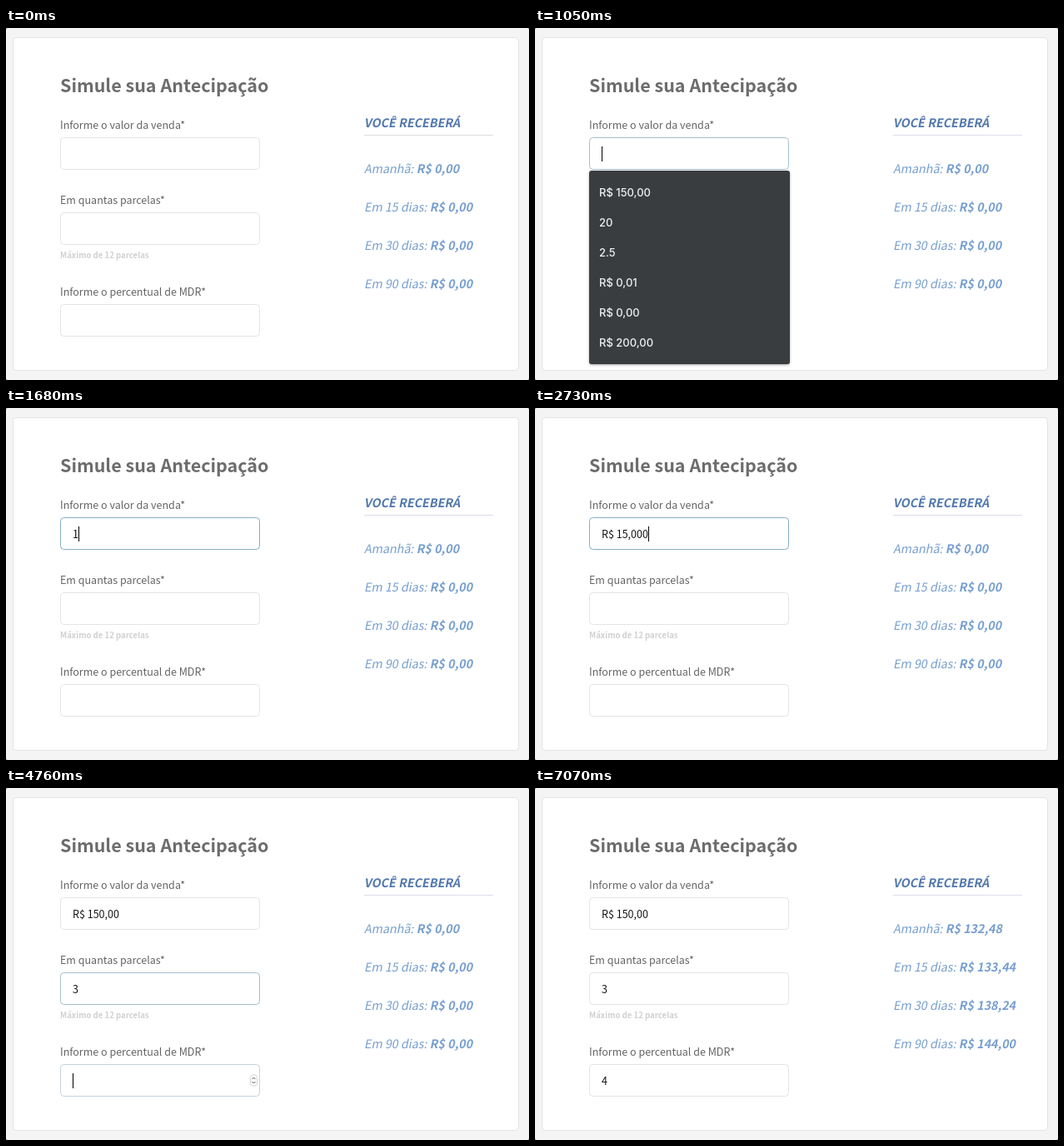
An HTML page with a canvas for the animation above (7.91 s loop, 628x422 px).

```html
<!DOCTYPE html>
<html lang="pt-BR">
<head>
<meta charset="utf-8">
<title>Simule sua Antecipação</title>
<style>
html, body { margin: 0; width: 100%; height: 100%; overflow: hidden; background: #f4f4f4; }
canvas { display: block; width: 628px; height: 422px; }
</style>
</head>
<body>
<canvas id="stage"></canvas>
<script>
const W = 628, H = 422, LOOP = 7910;
const SANS = '"Noto Sans CJK JP", "Noto Sans CJK SC", "Noto Sans CJK", "Noto Sans", sans-serif';
const UI = 'Inter, Roboto, sans-serif';
const canvas = document.getElementById('stage');
const ctx = canvas.getContext('2d');
const dpr = window.devicePixelRatio || 1;
canvas.width = W * dpr;
canvas.height = H * dpr;

// focus and blur in ms; typed holds [time, value]; blink is when the caret hides
const fields = [
  { y: 131, label: 'Informe o valor da venda*', focus: 980, blur: 3290, blink: [1540, 1680],
    typed: [[1680, '1'], [1820, 'R$ 0,01'], [1890, 'R$ 0,015'], [1960, 'R$ 0,15'], [2240, 'R$ 1,50'],
            [2380, 'R$ 1,500'], [2450, 'R$ 15,00'], [2730, 'R$ 15,000'], [2800, 'R$ 150,00']] },
  { y: 221, label: 'Em quantas parcelas*', focus: 3290, blur: 4760, blink: [3850, 4340],
    typed: [[4340, '3']], spinner: true, hover: [6790, 7070] },
  { y: 331, label: 'Informe o percentual de MDR*', focus: 4760, blur: 6090, blink: [5250, 5810],
    typed: [[5810, '4']], spinner: true }
];
const results = [
  ['Amanhã: ', 'R$ 132,48'],
  ['Em 15 dias: ', 'R$ 133,44'],
  ['Em 30 dias: ', 'R$ 138,24'],
  ['Em 90 dias: ', 'R$ 144,00']
];
const suggestions = ['R$ 150,00', '20', '2.5', 'R$ 0,01', 'R$ 0,00', 'R$ 200,00'];

const within = (t, [a, b]) => t >= a && t < b;
// The border colour moves in three 70 ms steps
const ramp = (t, start) => Math.min(1, Math.max(0, (Math.floor((t - start) / 70) + 1) / 3));
const mix = (a, b, k) => `rgb(${a.map((v, i) => Math.round(v + (b[i] - v) * k))})`;

function setFont(weight, size, family = SANS) {
  ctx.font = `${weight} ${size}px ${family}`;
}

function text(str, x, y, color) {
  ctx.fillStyle = color;
  ctx.fillText(str, x, y);
}

function slanted(str, x, y, color) {
  ctx.save();
  ctx.transform(1, 0, -0.2, 1, x, y);
  text(str, 0, 0, color);
  ctx.restore();
  return ctx.measureText(str).width;
}

function box(x, y, w, h, r, fill, stroke) {
  ctx.beginPath();
  ctx.roundRect(x, y, w, h, r);
  ctx.fillStyle = fill;
  ctx.fill();
  if (stroke) {
    ctx.strokeStyle = stroke;
    ctx.lineWidth = 1;
    ctx.stroke();
  }
}

function drawSpinner(y) {
  box(293.5, y + 12.5, 8, 14, 4, '#fff', '#d2d2d2');
  ctx.strokeStyle = '#555';
  ctx.beginPath();
  for (const [cy, dir] of [[y + 17, -1], [y + 22, 1]]) {
    ctx.moveTo(295.6, cy - dir);
    ctx.lineTo(297.5, cy + dir);
    ctx.lineTo(299.4, cy - dir);
  }
  ctx.stroke();
}

function drawField(f, t) {
  setFont(400, 12.53);
  text(f.label, 65, f.y - 10, '#646464');

  const glow = ramp(t, f.focus) - ramp(t, f.blur);
  box(65.5, f.y + 0.5, 239, 38, 4, '#fff', mix([228, 228, 228], [132, 173, 198], glow));

  const value = f.typed.reduce((last, [at, str]) => t >= at ? str : last, '');
  text(value, 80, f.y + 25, '#111');

  const active = within(t, [f.focus, f.blur]);
  if (active && !within(t, f.blink)) {
    ctx.fillStyle = '#000';
    ctx.fillRect(80 + Math.round(ctx.measureText(value).width), f.y + 11, 1, 18);
  }
  if (f.spinner && (active || f.hover && within(t, f.hover))) drawSpinner(f.y);
}

function drawResults(t) {
  setFont(700, 14.32);
  slanted('VOCÊ RECEBERÁ', 430, 119, '#5278ad');
  ctx.fillStyle = t < 70 ? '#dedede' : '#dcdeec';
  ctx.fillRect(430, 128, 155, 1);

  results.forEach(([label, amount], i) => {
    const y = 174 + i * 46;
    setFont(400, 14.32);
    const w = slanted(label, 430, y, '#779fcf');
    setFont(700, 14.32);
    slanted(t >= 6090 ? amount : 'R$ 0,00', 430 + w, y, '#779fcf');
  });
}

function drawSuggestions() {
  ctx.save();
  ctx.shadowColor = 'rgba(0,0,0,.35)';
  ctx.shadowBlur = 3 * dpr;
  ctx.shadowOffsetY = dpr;
  box(65, 171, 241, 232, 3, '#3a3d3f');
  ctx.restore();
  setFont(500, 13, UI);
  suggestions.forEach((s, i) => text(s, 77, 202 + i * 36, '#f0f0f0'));
}

function draw(t) {
  ctx.setTransform(dpr, 0, 0, dpr, 0, 0);
  ctx.fillStyle = '#8a8a8a';
  ctx.fillRect(0, 0, W, H);
  box(0, 0, W, H, 2.5, '#f4f4f4');
  box(8.5, 11.5, 607, 399, 4, '#fff', '#e1e3e3');

  setFont(700, 21.5);
  text('Simule sua Antecipação', 65, 76.5, '#6c6c6c');
  for (const f of fields) drawField(f, t);
  setFont(700, 9.6);
  text('Máximo de 12 parcelas', 65, 276, '#d0d0d0');
  drawResults(t);
  if (within(t, [1050, 1680])) drawSuggestions();
}

const start = performance.now();
function tick() {
  draw((performance.now() - start) % LOOP);
  requestAnimationFrame(tick);
}
tick();
</script>
</body>
</html>
```
